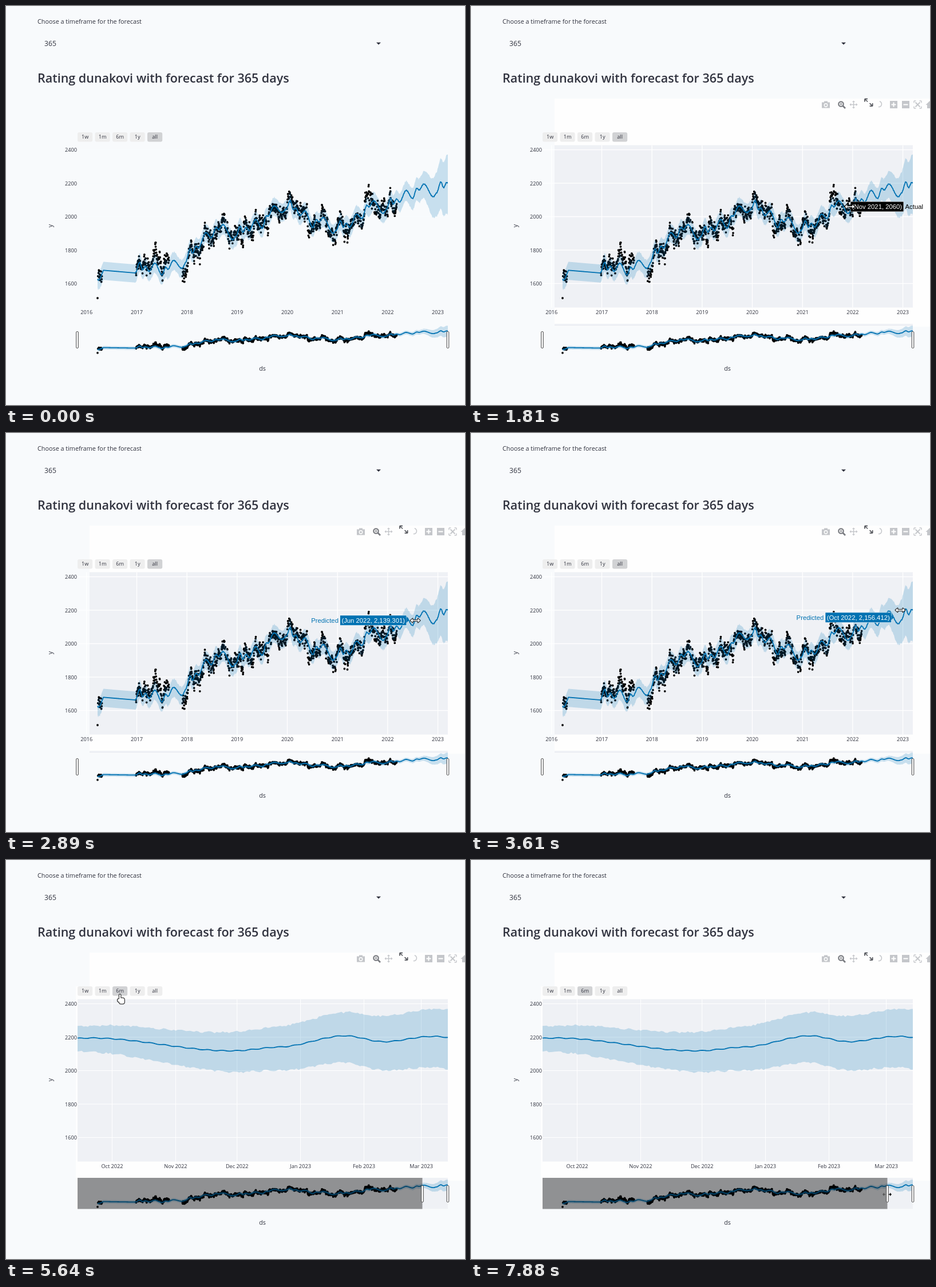
An HTML page with a canvas for the animation above (8000 ms loop, 802 by 698 pixels).

```html
<!DOCTYPE html>
<html lang="en">
<head>
<meta charset="utf-8">
<title>Rating forecast</title>
<style>
html, body { margin: 0; width: 100%; height: 100%; overflow: hidden; background: #f8fafc; }
canvas { display: block; }
</style>
</head>
<body>
<canvas id="stage" width="802" height="698"></canvas>
<script>
const ctx = document.getElementById('stage').getContext('2d');
const LOOP = 8000, PAGE = '#f8fafc', PLOT = '#eff1f5', INK = '#31333f', BLUE = '#0072b2';
const SANS = '"Open Sans", "Noto Sans", sans-serif', ARIAL = '"Liberation Sans", Arial, sans-serif';
const LEFT = 125, RIGHT = 772, ZOOM = 14.9, ZOOM_START = RIGHT - (RIGHT - LEFT) / ZOOM;
const YEAR = 87.68, YEAR_0 = 140.8;
const MONTHS = 'Jan Feb Mar Apr May Jun Jul Aug Sep Oct Nov Dec'.split(' ');

// ---- data: piecewise trend + yearly season + weekly ripple -------------
let seed = 11;
function rand() {
  seed = (seed + 0x6D2B79F5) | 0;
  let t = Math.imul(seed ^ (seed >>> 15), 1 | seed);
  t = (t + Math.imul(t ^ (t >>> 7), 61 | t)) ^ t;
  return ((t ^ (t >>> 14)) >>> 0) / 4294967296;
}
const gauss = () => (rand() + rand() + rand() - 1.5) * 2;
const linear = u => u, smooth = u => u * u * (3 - 2 * u);

function between(points, x, ease) {
  let i = 1;
  while (i < points.length - 1 && points[i][0] < x) i++;
  const [x0, y0] = points[i - 1], [x1, y1] = points[i];
  return y0 + (y1 - y0) * ease((x - x0) / (x1 - x0));
}
const trend = [
  [160, 130], [232, 110], [282, 122], [320, 88], [362, 52], [405, 48], [450, 37],
  [484, 0], [497, 2], [537, 38], [606, 37], [630, 13], [667, 0], [772, -34.5]];
// turning points by fraction of the year
const season = [
  [0.06, 338], [0.115, 350], [0.175, 342.5], [0.24, 350], [0.365, 333], [0.5, 351],
  [0.58, 335.5], [0.63, 340], [0.715, 332], [0.915, 360], [0.975, 355], [1.06, 338]];

function lineY(x) {
  if (x > 170 && x < 226) return between([[170, lineY(170)], [226, lineY(226)]], x, linear);
  let part = (x - YEAR_0) / YEAR % 1;
  if (part < 0.06) part++;
  const ripple = 0.7 * Math.sin((RIGHT - x) * ZOOM / 25 * 2 * Math.PI);
  return between(trend, x, linear) + between(season, part, smooth) + ripple;
}
const halfBand = x => x < 690 ? 16 : x < 728 ? 16 + (x - 690) / 38 * 6 : 22 + (x - 728) / 44 * 31;
const jitter = x => x > 170 && x < 226 ? 0 : (rand() - 0.5) * 3;

const dots = [[160, 511]];
for (let i = 0; i < 18; i++) dots.push([160 + rand() * 9, 461 + rand() * 22]);
let drift = 0;
for (let x = 227; x < 683; x += 0.2 + rand() * 0.4) {
  drift = 0.85 * drift + 6.5 * gauss();
  if (x < 285 || x > 308) dots.push([x, lineY(x) + drift]);
}

// ---- chart layers -----------------------------------------------------
function layers(from, count, X, Y) {
  const line = new Path2D(), band = new Path2D(), marks = new Path2D(), low = [];
  for (let i = 0; i <= count; i++) {
    const x = from + (RIGHT - from) * i / count, y = lineY(x), h = halfBand(x);
    line.lineTo(X(x), Y(y));
    band.lineTo(X(x), Y(y - h * 0.93 + jitter(x)));
    low.unshift([X(x), Y(y + h * 1.05 + jitter(x))]);
  }
  low.forEach(p => band.lineTo(...p));
  for (const [x, y] of dots) {
    marks.moveTo(X(x) + 1.9, Y(y));
    marks.arc(X(x), Y(y), 1.9, 0, 7);
  }
  return { line, band, marks };
}
const same = v => v;
const full = layers(160, 612, same, same);
const mini = layers(160, 612, same, y => 556 + (y - 243.5) * 0.19);
const zoomed = layers(ZOOM_START, 181, x => RIGHT - (RIGHT - x) * ZOOM, same);

function rect(x, y, w, h, color) {
  ctx.fillStyle = color;
  ctx.fillRect(x, y, w, h);
}
function text(s, x, y, font, align = 'left', color = INK) {
  ctx.font = font;
  ctx.textAlign = align;
  ctx.fillStyle = color;
  ctx.fillText(s, x, y);
}
const small = `9.2px ${SANS}`, axis = `10.7px ${SANS}`;

function plot(layer, top, height, withDots) {
  ctx.save();
  ctx.beginPath();
  ctx.rect(LEFT, top, RIGHT - LEFT, height);
  ctx.clip();
  if (withDots) {
    ctx.fillStyle = '#000';
    ctx.fill(layer.marks);
  }
  ctx.fillStyle = 'rgba(0,114,178,.2)';
  ctx.fill(layer.band);
  ctx.strokeStyle = BLUE;
  ctx.lineWidth = 1.8;
  ctx.lineJoin = 'round';
  ctx.stroke(layer.line);
  ctx.restore();
}
function handle(x) {
  ctx.beginPath();
  ctx.roundRect(x - 1.8, 569.5, 3.6, 29, 1.5);
  ctx.fillStyle = '#fff';
  ctx.fill();
  ctx.strokeStyle = '#444';
  ctx.lineWidth = 1;
  ctx.stroke();
}
function ticks(zoom) {
  if (!zoom) return Array.from({ length: 8 }, (_, i) => [2016 + i, YEAR_0 + YEAR * i]);
  const perDay = 3.577, first = new Date(2022, 9, 1);
  return Array.from({ length: 6 }, (_, i) => {
    const day = new Date(2022, 9 + i, 1);
    const x = 185.5 + Math.round((day - first) / 864e5) * perDay;
    return [`${MONTHS[day.getMonth()]} ${day.getFullYear()}`, x];
  });
}
function chart(zoom, grid) {
  const w = zoom ? 1 : 1.3;
  for (const [name, x] of ticks(zoom)) {
    rect(x - w / 2, 243.5, w, 284, grid);
    text(name, x, 539, small, 'center');
  }
  for (let i = 0; i < 5; i++) {
    const y = 251.5 + 58.5 * i;
    rect(LEFT, y - w / 2, RIGHT - LEFT, w, grid);
    text(2400 - 200 * i, 124, y + 3.6, small, 'right');
  }
  plot(zoom ? zoomed : full, 243.5, 284, !zoom);
  plot(mini, 556, 54.5, true);
  if (zoom) rect(LEFT, 556, 602.5, 54.5, 'rgba(0,0,0,.4)');
  handle(zoom ? 727.5 : 124.5);
  handle(RIGHT);
}
function buttons(zoom, hover) {
  ['1w', '1m', '6m', '1y', 'all'].forEach((name, i) => {
    const on = name === (zoom ? '6m' : 'all') || (hover && name === '6m');
    ctx.beginPath();
    ctx.roundRect(125 + 30.5 * i, 221, 26.2, 16.6, 3);
    ctx.fillStyle = on ? '#d1d2d4' : '#eeeeee';
    ctx.fill();
    text(name, 138.1 + 30.5 * i, 232.4, small, 'center');
  });
}

// ---- toolbar ----------------------------------------------------------
function stroke(x0, y0, x1, y1, color, width) {
  ctx.beginPath();
  ctx.moveTo(x0, y0);
  ctx.lineTo(x1, y1);
  ctx.strokeStyle = color;
  ctx.lineWidth = width;
  ctx.stroke();
}
function cross(x, y, r, color, width) {
  stroke(x - r, y, x + r, y, color, width);
  stroke(x, y - r, x, y + r, color, width);
}
function ring(x, y, r, color, width, a = 0, b = 7) {
  ctx.beginPath();
  ctx.arc(x, y, r, a, b);
  ctx.strokeStyle = color;
  ctx.lineWidth = width;
  ctx.stroke();
}
function head(x, y, dx, dy, s, color) {
  ctx.beginPath();
  ctx.moveTo(x, y);
  ctx.lineTo(x - (dx + dy) * s, y + (dx - dy) * s);
  ctx.lineTo(x + (dy - dx) * s, y - (dx + dy) * s);
  ctx.fillStyle = color;
  ctx.fill();
}
function toolbar(alpha) {
  const pale = '#c4c6ca', mid = '#797b80', dark = '#55575d', cy = 172.5;
  ctx.save();
  ctx.globalAlpha = alpha;
  // camera
  rect(613, 168.5, 14, 10, pale);
  rect(617, 166.5, 6, 3, pale);
  ring(620, 173.5, 2.7, '#fff', 1.4);
  // magnifier
  ring(646.5, 171.5, 4.2, mid, 2.2);
  stroke(649.5, 174.5, 654, 179, mid, 2.6);
  cross(646.5, 171.5, 2, mid, 1);
  // pan
  cross(668.5, cy, 5.5, pale, 1.4);
  for (const d of [-1, 1]) {
    head(668.5 + 7 * d, cy, d, 0, 2.6, pale);
    head(668.5, cy + 7 * d, 0, d, 2.6, pale);
    // expand
    const x = 694.8 + 6.8 * d, y = 168.8 + 6.3 * d;
    head(x, y, d, 0, 0, dark);
    stroke(x, y, x - 5 * d, y - 5 * d, dark, 1.6);
    stroke(x, y, x - 5 * d, y, dark, 1.8);
    stroke(x, y, x, y - 5 * d, dark, 1.8);
  }
  // lasso
  ring(712.5, 171.5, 5, pale, 1.5, -1.3, 1.7);
  // plus and minus
  rect(732, 166, 13, 13, pale);
  rect(753, 166, 13, 13, pale);
  cross(738.5, cy, 4, '#fff', 2);
  stroke(755.5, cy, 763.5, cy, '#fff', 2);
  // autoscale
  for (const dx of [-1, 1]) for (const dy of [-1, 1]) {
    const x = 780.5 + 6.5 * dx, y = cy + 6.5 * dy;
    stroke(x, y, x - 3.5 * dx, y, pale, 1.4);
    stroke(x, y, x, y - 3.5 * dy, pale, 1.4);
    stroke(780.5, cy, 780.5 + 4 * dx, cy + 4 * dy, pale, 1.8);
  }
  // home
  head(801.5, 166, 0, -1, 7, pale);
  rect(797, 172, 9, 7, pale);
  ctx.restore();
}

// ---- pointer ----------------------------------------------------------
// each move: start, end, steps, x, y, ease-out power, sag
const moves = [
  [500, 870, 5, 488, 374.5],
  [1140, 1900, 10, 669, 350, 1.4],
  [1990, 2170, 3, 672, 349],
  [2350, 3070, 9, 727.5, 322],
  [3160, 3880, 9, 757, 306, 1.3],
  [4600, 5400, 10, 199, 235, 4, 50],
  [6370, 6460, 2, 192, 235],
  [6900, 7620, 9, 727, 592, 1.5],
  [7710, 7880, 2, 727, 585]];
function pointer(t) {
  let x = 430, y = 440;
  for (const [t0, t1, steps, tx, ty, power = 1, sag = 0] of moves) {
    if (t < t0) break;
    const k = Math.min(steps, Math.floor((t - t0) / (t1 - t0) * (steps - 1) + 0.2) + 1);
    const e = 1 - (1 - k / steps) ** power;
    x += (tx - x) * e;
    y += (ty - y) * e + sag * Math.sin(Math.PI * e);
  }
  return [x, y];
}
function outlined(path) {
  ctx.strokeStyle = '#111';
  ctx.lineWidth = 2;
  ctx.lineJoin = 'round';
  ctx.stroke(path);
  ctx.fillStyle = '#fff';
  ctx.fill(path);
}
function hand(x, y) {
  const path = new Path2D();
  path.roundRect(x - 1.2, y, 2.6, 12, 1.3);
  path.roundRect(x - 4, y + 8, 4, 5, 2);
  path.roundRect(x - 1.2, y + 6.5, 9, 10, 3);
  outlined(path);
}
function arrows(x, y) {
  const path = new Path2D();
  for (const d of [1, -1])
    for (const [dx, dy] of [[4.5, -0.8], [4.5, -3.4], [8.4, 0], [4.5, 3.4], [4.5, 0.8]])
      path.lineTo(x + d * dx, y + d * dy);
  path.closePath();
  outlined(path);
}
function resizer(x, y) {
  for (const d of [-1, 1]) {
    const color = d < 0 ? '#555' : '#000';
    stroke(x + 3 * d, y, x + 7 * d, y, color, 1.4);
    head(x + 8 * d, y, d, 0, 3, color);
  }
}
function drawPointer(t, x, y) {
  if (t >= 7620) resizer(x, y);
  else if (t >= 5310 && t < 6900) hand(x, y);
  else arrows(x, y);
}

// ---- hover label ------------------------------------------------------
function dateAt(x) {
  const years = (x - YEAR_0) / YEAR;
  return MONTHS[Math.floor(years % 1 * 12)] + ' ' + (2016 + Math.floor(years));
}
const valueAt = y => 2400 - (y - 251.5) / 0.2925;

function label(x, y, value, name, color, side) {
  const body = `(${dateAt(x)}, ${value})`, font = `11.3px ${ARIAL}`;
  ctx.font = font;
  const w = ctx.measureText(body).width + 5;
  const near = x + side * 4.5, far = near + side * w;
  rect(Math.min(near, far) - 0.5, y - 9, w + 1, 18, '#fff');
  rect(Math.min(near, far), y - 8.5, w, 17, color);
  head(x, y, -side, 0, 4.5, color);
  text(body, (near + far) / 2, y + 4, font, 'center', '#fff');
  text(name, far + side * 3, y + 4, font, side > 0 ? 'left' : 'right', color);
}
function hoverLabel(t, x, y) {
  if (t >= 1140 && t < 2350) label(x - 3, y, Math.round(valueAt(y)), 'Actual', '#000', 1);
  if (t >= 2350 && t < 4600) {
    const px = x - 11.2, py = lineY(px);
    if (Math.abs(py - y) > 16) return;
    const value = valueAt(py).toLocaleString('en-US', { minimumFractionDigits: 3, maximumFractionDigits: 3 });
    label(px, py, value, 'Predicted', BLUE, -1);
  }
}

// ---- scene ------------------------------------------------------------
function draw(t) {
  const active = t >= 500, zoom = t >= 5640;
  rect(0, 0, 802, 698, PAGE);
  text('Choose a timeframe for the forecast', 55, 31, `10.8px ${SANS}`);
  text('365', 67, 70, `12.2px ${SANS}`);
  head(651, 67.8, 0, 1, 4, INK);
  text('Rating dunakovi with forecast for 365 days', 55, 133.5, `600 21.5px ${SANS}`);

  if (active) {
    rect(146, 162, 656, 399, '#fefefe');
    if (zoom) rect(122, 221, 650, 390, '#fefefe');
    const x = zoom ? LEFT : 146;
    rect(x, 243.5, RIGHT - x, 284, PLOT);
    rect(x, 556, RIGHT - x, zoom ? 54.5 : 4, PLOT);
    toolbar(Math.min(1, (Math.floor((t - 500) / 92) + 1) / 5));
  }
  chart(zoom, active ? '#fff' : PAGE);
  buttons(zoom, t >= 5310);
  text('ds', 448, 637.5, axis, 'center');
  ctx.save();
  ctx.translate(81, 384.5);
  ctx.rotate(-Math.PI / 2);
  text('y', 0, 0, axis, 'center');
  ctx.restore();

  if (active) {
    const [x, y] = pointer(t);
    hoverLabel(t, x, y);
    drawPointer(t, x, y);
  }
}
const start = performance.now();
function frame() {
  draw((performance.now() - start) % LOOP);
  requestAnimationFrame(frame);
}
frame();
</script>
</body>
</html>
```
